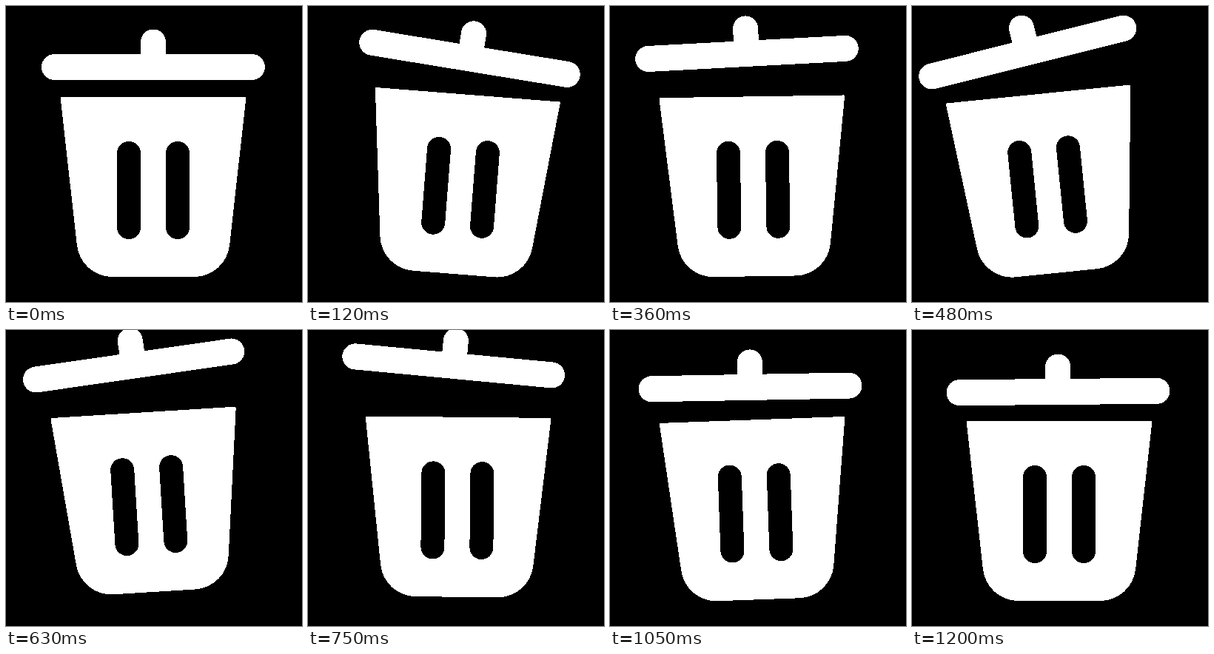
Write an HTML page that moves like this. It is 400 px wide and 400 px high and loops after 3.23 s.

```html
<!DOCTYPE html>
<html lang="en">
<head>
<meta charset="utf-8">
<title>Trash can</title>
<style>
  html, body { margin: 0; width: 100%; height: 100%; overflow: hidden; background: #000; }
  svg { display: block; width: 100%; height: 100%; shape-rendering: crispEdges; }
</style>
</head>
<body>
<svg viewBox="0 0 400 400">
  <g id="can">
    <path fill="#fff" d="M-124-126H124Q125.500-126 125.300-124L103.100 74.300A48 48 0 0 1 55.400 117H-55.400A48 48 0 0 1-103.100 74.300L-125.300-124Q-125.500-126-124-126Z"/>
    <rect x="-49" y="-66" width="32" height="132" rx="16"/>
    <rect x="17" y="-66" width="32" height="132" rx="16"/>
  </g>
  <g id="lid" fill="#fff">
    <rect x="-151" y="-17.500" width="302" height="35" rx="17.500"/>
    <rect x="-17" y="-51" width="34" height="60" rx="17"/>
  </g>
</svg>
<script>
const STEP = 30, END = 1200, LOOP = 3230;

// Turning points of each swing
const can = {
  time: [0, 180, 510, 815, 1050, END],
  x: [199, 208.4, 182.6, 201.7, 196.6, 199],
  angle: [0, 6, -6, 1.35, -2.06, 0]
};
const lid = {
  time: [0, 180, 510, 895, 1050, END],
  x: [199, 225, 154.8, 211.5, 189.5, 197.5],
  y: [82.5, 67, 62.5, 51.4, 77.4, 83.5],
  angle: [0, 12.4, -14.6, 14.4, -1, -0.5]
};

const ease = u => (1 - Math.cos(Math.PI * u)) / 2;

function swing(part, key, t) {
  const { time } = part, v = part[key];
  let i = 0;
  while (i < time.length - 2 && t >= time[i + 1]) i++;
  return v[i] + (v[i + 1] - v[i]) * ease((t - time[i]) / (time[i + 1] - time[i]));
}

// One small jump after the second rock
function hop(t) {
  const u = (t - 510) / 290;
  return u > 0 && u < 1 ? Math.sin(Math.PI * u) : 0;
}

function place(id, x, y, angle) {
  document.getElementById(id).setAttribute("transform", `translate(${x} ${y}) rotate(${angle})`);
}

function draw(ms) {
  const t = Math.min(END, Math.floor((ms % LOOP) / STEP) * STEP);
  const h = hop(t), tilt = swing(can, "angle", t);
  // Rocking on a corner lifts the middle of the can
  const lift = 46 * Math.abs(Math.sin(tilt * Math.PI / 180));
  place("can", swing(can, "x", t) + 4.4 * h, 249 - lift - 9.4 * h, tilt);
  place("lid", swing(lid, "x", t) + 5.5 * h, swing(lid, "y", t) - 12.5 * h, swing(lid, "angle", t));
}

let start;
function tick(now) {
  start ??= now;
  draw(now - start);
  requestAnimationFrame(tick);
}
draw(0);
requestAnimationFrame(tick);
</script>
</body>
</html>
```
